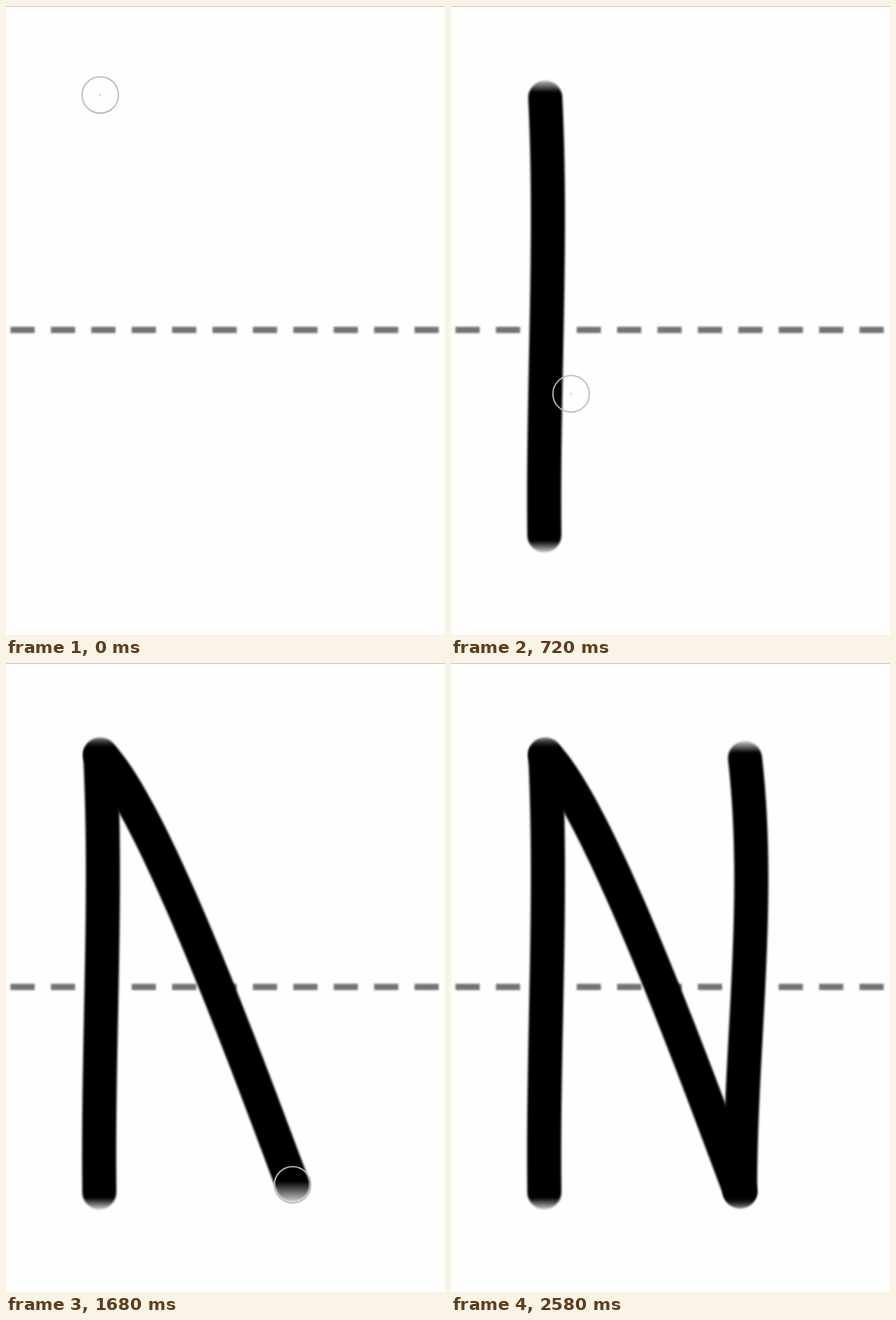
These frames come from a looping animation (489x700 px, 9000 ms). An HTML page with a canvas:

```html
<!DOCTYPE html>
<html lang="en">
<head>
<meta charset="utf-8">
<title>Writing the letter N</title>
<style>
html, body { margin: 0; width: 100%; height: 100%; overflow: hidden; background: #fefefe; }
canvas { display: block; }
</style>
</head>
<body>
<canvas id="stage" width="489" height="700"></canvas>
<script>
const ctx = document.getElementById('stage').getContext('2d');
const LOOP = 9000, STEP = 30, PEN = 38;

// curve: cubic Bezier points; keys: [time, drawn share]
const strokes = [
  { curve: [[105, 102], [113, 264], [102, 427], [104, 589]],
    keys: [[60, 0], [150, .12], [420, .93], [480, 1]] },
  { curve: [[105, 102], [165, 165], [262, 428], [322, 588]],
    keys: [[1170, 0], [1350, .13], [1470, .395], [1680, .985], [1710, 1]] },
  { curve: [[322, 588], [322, 427], [346, 267], [327.5, 106]],
    keys: [[1750, 0], [1890, .235], [1980, .578], [2100, .96], [2160, 1]] }
];

// free moves of the pen ring: [time, x, y]
const moves = [
  [0, 105, 99], [60, 105, 99], [480, 105, 594], [570, 108, 590],
  [750, 139, 400], [930, 118, 145], [1020, 114, 128], [1140, 105, 103],
  [1710, 322, 589], [1750, 322, 588], [2220, 327.5, 106],
  [2400, 400, 60], [2580, 515, 47]
];

function track(keys, t) {
  if (t <= keys[0][0]) return keys[0].slice(1);
  const i = keys.findIndex(k => k[0] > t);
  if (i < 0) return keys[keys.length - 1].slice(1);
  const a = keys[i - 1], b = keys[i], u = (t - a[0]) / (b[0] - a[0]);
  return a.slice(1).map((v, n) => v + (b[n + 1] - v) * u);
}

function bezier(p, u) {
  const v = 1 - u;
  return [0, 1].map(k => v * v * v * p[0][k] + 3 * v * v * u * p[1][k] +
    3 * v * u * u * p[2][k] + u * u * u * p[3][k]);
}

function drawGuides() {
  ctx.fillStyle = '#fefefe';
  ctx.fillRect(0, 0, 489, 700);
  ctx.fillStyle = '#ccc';
  ctx.fillRect(0, 0, 489, 1);
  ctx.filter = 'blur(1px)';
  ctx.fillStyle = '#747474';
  for (let i = 0; i < 11; i++) ctx.fillRect(5 + 45 * i, 357, 27, 7);
  ctx.filter = 'none';
}

function drawStroke({ curve, keys }, t) {
  if (t <= keys[0][0]) return;
  const [share] = track(keys, t);
  const start = curve[0], end = bezier(curve, share);
  const dir = Math.sign(curve[3][1] - start[1]);
  const y0 = start[1] - dir * 20, y1 = end[1] + dir * 20;
  const height = Math.abs(y1 - y0);
  const edge = px => Math.min(.5, px / height);

  // ink thins out at both ends, more so at the wet tip
  const ink = ctx.createLinearGradient(0, y0, 0, y1);
  ink.addColorStop(0, 'rgba(0,0,0,.2)');
  ink.addColorStop(edge(14), '#000');
  ink.addColorStop(1 - edge(share < 1 ? 24 : 14), '#000');
  ink.addColorStop(1, 'rgba(0,0,0,.15)');

  ctx.beginPath();
  ctx.moveTo(...start);
  for (let i = 1; i <= 40; i++) ctx.lineTo(...bezier(curve, share * i / 40));
  ctx.strokeStyle = ink;
  ctx.lineWidth = PEN;
  ctx.lineCap = ctx.lineJoin = 'round';
  ctx.filter = 'blur(0.8px)';
  ctx.stroke();
  ctx.filter = 'none';
}

function ringAt(t) {
  const s = strokes.find(({ keys }) => t > keys[0][0] && t < keys[keys.length - 1][0]);
  return s ? bezier(s.curve, track(s.keys, t)[0]) : track(moves, t);
}

function draw(t) {
  const [x, y] = ringAt(t);
  const shown = t < 2580;
  drawGuides();
  if (shown) {
    ctx.fillStyle = '#d4d4d4';
    ctx.fillRect(x - 1, y - 1, 2, 2);
  }
  strokes.forEach(s => drawStroke(s, t));
  if (shown) {
    ctx.beginPath();
    ctx.arc(x, y, 20.3, 0, 7);
    ctx.strokeStyle = '#bbb';
    ctx.lineWidth = 1.5;
    ctx.stroke();
  }
}

const begin = performance.now();
function frame() {
  const t = (performance.now() - begin) % LOOP;
  draw(Math.floor(t / STEP) * STEP);
  requestAnimationFrame(frame);
}
frame();
</script>
</body>
</html>
```
